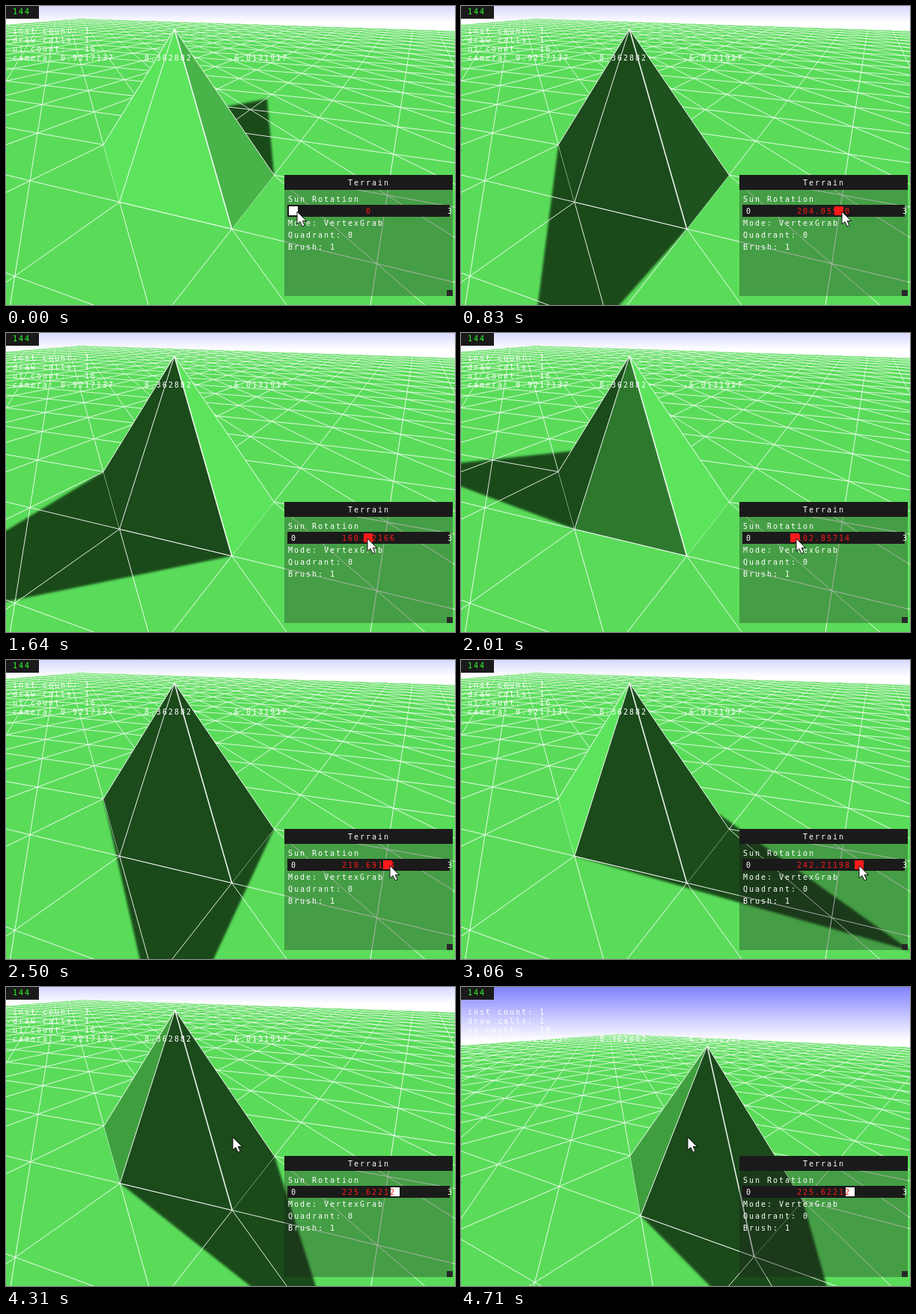
These frames come from a looping animation (600 by 400 pixels, 4750 ms). An HTML page with a canvas:

```html
<!DOCTYPE html>
<html>
<head>
<meta charset="utf-8">
<style>
html, body { margin: 0; height: 100%; overflow: hidden; }
canvas { display: block; }
</style>
</head>
<body>
<canvas id="stage" width="600" height="400"></canvas>
<script>
const ctx = document.getElementById('stage').getContext('2d');
const LOOP = 4750, RAD = Math.PI / 180;
const { sin, cos, tan, min, max, hypot, atan2, round } = Math;

// Lengths are in units of the camera height.
const FOCAL = 534, TILE = 0.625, GRID_ANGLE = 23.5 * RAD, EXTENT = 17;
const CENTER = [-0.318, 2.37], PEAK = 0.798, SHADOW = 1.68;
const HEXAGON = [[1, 0], [0, 1], [-1, 1], [-1, 0], [0, -1], [1, -1]];
const STEPS = 217, DARK = '#1a4a1a', BAR = '#1a1a1a', RED = '#ff1a1a';

// Slider position in pixels over time: [ms, px]
const DRAG = [[0, 0], [40, 0], [550, 93], [830, 123], [1110, 153], [1250, 157],
  [1640, 97], [2010, 62], [2180, 62], [2420, 123], [2500, 127], [2740, 160],
  [3060, 146], [3300, 104], [3500, 64], [3670, 73], [3830, 95], [4080, 136],
  [4750, 136]];

function slope(i) {
  if (i < 1 || i > DRAG.length - 2) return 0;
  const [[t0, a], [t1, b], [t2, c]] = DRAG.slice(i - 1, i + 2);
  return (b - a) * (c - b) > 0 ? (c - a) / (t2 - t0) : 0;
}

function slider(t) {
  t = max(0, t);
  const i = max(1, DRAG.findIndex(k => k[0] >= t));
  const [t0, a] = DRAG[i - 1], [t1, b] = DRAG[i];
  const d = t1 - t0, u = (t - t0) / d, v = 1 - u;
  return a * v * v * (1 + 2 * u) + b * u * u * (3 - 2 * u)
    + d * u * v * (slope(i - 1) * v - slope(i) * u);
}

function ease(t, from, to) {
  const u = min(1, max(0, (t - from) / (to - from)));
  return u * u * (3 - 2 * u);
}

const GC = TILE * cos(GRID_ANGLE), GS = TILE * sin(GRID_ANGLE);
const offset = (i, j) => [i * GC + j * GS, j * GC - i * GS];
const ground = (i, j) => {
  const [x, z] = offset(i, j);
  return [CENTER[0] + x, CENTER[1] + z];
};

function makeCamera(move) {
  const pitch = (22.44 - 4.69 * move) * RAD, turn = 10.6 * move * RAD;
  const ps = sin(pitch), pc = cos(pitch), ts = sin(turn), tc = cos(turn);
  const project = ([x, z], y = -1) => {
    const side = x * tc + z * ts, ahead = z * tc - x * ts - 0.065 * move;
    const depth = ahead * pc - y * ps;
    return [300 + FOCAL * side / depth,
      200 - FOCAL * (y * pc + ahead * ps) / depth, depth];
  };
  return { project, horizon: 200 - FOCAL * tan(pitch) };
}

function polygon(points, fill) {
  ctx.beginPath();
  points.forEach(p => ctx.lineTo(p[0], p[1]));
  ctx.closePath();
  ctx.fillStyle = fill;
  ctx.fill();
}

function line(a, b) {
  ctx.beginPath();
  ctx.moveTo(a[0], a[1]);
  ctx.lineTo(b[0], b[1]);
  ctx.stroke();
}

function rect(x, y, w, h, fill) {
  ctx.fillStyle = fill;
  ctx.fillRect(x, y, w, h);
}

function label(text, x, y, fill = '#fff') {
  ctx.fillStyle = fill;
  ctx.fillText(text, x, y);
}

function drawSky(horizon) {
  const sky = ctx.createLinearGradient(0, horizon - 29, 0, horizon + 43);
  sky.addColorStop(0, '#8282ff');
  sky.addColorStop(1, '#fff');
  rect(0, 0, 600, 400, sky);
}

function drawShadow(project, angle) {
  const dx = SHADOW * sin(angle), dz = SHADOW * cos(angle);
  const around = ([x, z]) => {
    const vx = x - dx, vz = z - dz;
    return atan2(vz * dx - vx * dz, -vx * dx - vz * dz);
  };
  const rim = HEXAGON.map(h => offset(...h)).sort((a, b) => around(a) - around(b));
  const points = [rim[0], [dx, dz], rim[5]]
    .map(([x, z]) => project([CENTER[0] + x, CENTER[1] + z]));
  ctx.filter = 'blur(1.5px)';
  polygon(points, DARK);
  ctx.filter = 'none';
}

function drawGrid(project) {
  const points = new Map();
  const at = (i, j) => {
    const key = i * 100 + j;
    if (!points.has(key)) points.set(key, project(ground(i, j)));
    return points.get(key);
  };
  ctx.strokeStyle = '#fff';
  ctx.lineWidth = 1;
  for (let i = -EXTENT; i <= EXTENT; i++) {
    for (let j = -EXTENT; j <= EXTENT; j++) {
      const a = at(i, j);
      if (a[2] < 0.2) continue;
      ctx.globalAlpha = max(0.55, 0.95 - a[2] * 0.035);
      for (const [di, dj] of [[1, 0], [0, 1], [1, -1]]) {
        const p = i + di, q = j + dj;
        if (p > EXTENT || q > EXTENT || q < -EXTENT) continue;
        if ((!i && !j) || (!p && !q)) continue;
        const b = at(p, q);
        if (b[2] > 0.2) line(a, b);
      }
    }
  }
  ctx.globalAlpha = 1;
}

function faceColor(a, b, angle) {
  const [ax, az] = offset(...a), [bx, bz] = offset(...b);
  const n = [PEAK * (bz - az), ax * bz - az * bx, PEAK * (ax - bx)];
  const sun = [-SHADOW * sin(angle), PEAK, -SHADOW * cos(angle)];
  const dot = n[0] * sun[0] + n[1] * sun[1] + n[2] * sun[2];
  const light = max(0, dot / hypot(...n) / hypot(...sun));
  const g = 74 + min(154, 405 * light), rb = g * 0.43 - 5;
  return `rgb(${rb},${g},${rb})`;
}

function drawPyramid(project, angle) {
  const apex = project(CENTER, PEAK - 1);
  const rim = HEXAGON.map(h => project(ground(...h)));
  for (const i of [3, 4, 5]) {
    const k = (i + 1) % 6;
    polygon([apex, rim[i], rim[k]], faceColor(HEXAGON[i], HEXAGON[k], angle));
  }
  ctx.strokeStyle = 'rgba(255,255,255,.9)';
  for (const i of [3, 4, 5, 0]) {
    ctx.lineWidth = i === 5 ? 1.6 : 1;
    line(apex, rim[i]);
  }
  ctx.lineWidth = 1;
  line(rim[4], rim[5]);
}

function drawInterface(value, handle, held) {
  ctx.font = '10px "DejaVu Sans Mono", monospace';
  ctx.letterSpacing = '1.98px';
  rect(0, 0, 44, 17, BAR);
  label('144', 9, 11, '#2dff2d');
  ['inst count: 1', 'draw calls: 1', 'ui count:   16',
    'camera: 0.9217137     8.362882      -6.0131917']
    .forEach((text, i) => label(text, 9, 37 + 12 * i));

  rect(372, 246, 225, 142, 'rgba(26,26,26,.32)');
  rect(372, 226, 225, 20, BAR);
  label('Terrain', 457, 240);
  label('Sun Rotation', 377, 262);
  rect(376, 266, 217, 16, BAR);
  rect(378 + handle, 268, 12, 12, held ? RED : '#fff');
  label('0', 381, 278);
  ctx.save();
  ctx.beginPath();
  ctx.rect(372, 226, 225, 162);
  ctx.clip();
  label('360', 590, 278);
  ctx.restore();
  const degrees = value ? (value * 360 / STEPS).toPrecision(8) : '0';
  label(degrees, 485 - 4 * degrees.length, 278, RED);
  label('Mode: VertexGrab', 377, 294);
  label('Quadrant: 0', 377, 310);
  label('Brush: 1', 377, 326);
  rect(589, 380, 8, 8, '#282828');
}

function drawCursor(x, y) {
  const arrow = [[0, 0], [0, 17], [4, 13.5], [7, 20], [10, 18.5], [7.2, 12.5], [12.5, 12.5]];
  polygon(arrow.map(([px, py]) => [x + px, y + py]), '#fff');
  ctx.strokeStyle = '#111';
  ctx.lineWidth = 1;
  ctx.stroke();
}

function draw(t) {
  const value = round(slider(t)), handle = round(slider(t - 25));
  const angle = (24 - handle * 360 / STEPS) * RAD;
  const { project, horizon } = makeCamera(ease(t, 4290, 4710));

  drawSky(horizon);
  polygon([project(ground(-EXTENT, -5)), project(ground(-EXTENT, EXTENT)),
    project(ground(EXTENT, EXTENT)), [1500, 900], [-1500, 900]], '#5adc5a');
  drawShadow(project, angle);
  drawGrid(project);
  drawPyramid(project, angle);
  drawInterface(value, handle, t >= 40 && t < 4110);

  const leave = ease(t, 4110, 4290);
  const x = t < 40 ? 389 : 386 + value;
  drawCursor(x + (303 - x) * leave, 275 - 74 * leave);
}

const start = performance.now();
function tick() {
  draw((performance.now() - start) % LOOP);
  requestAnimationFrame(tick);
}
tick();
</script>
</body>
</html>
```
